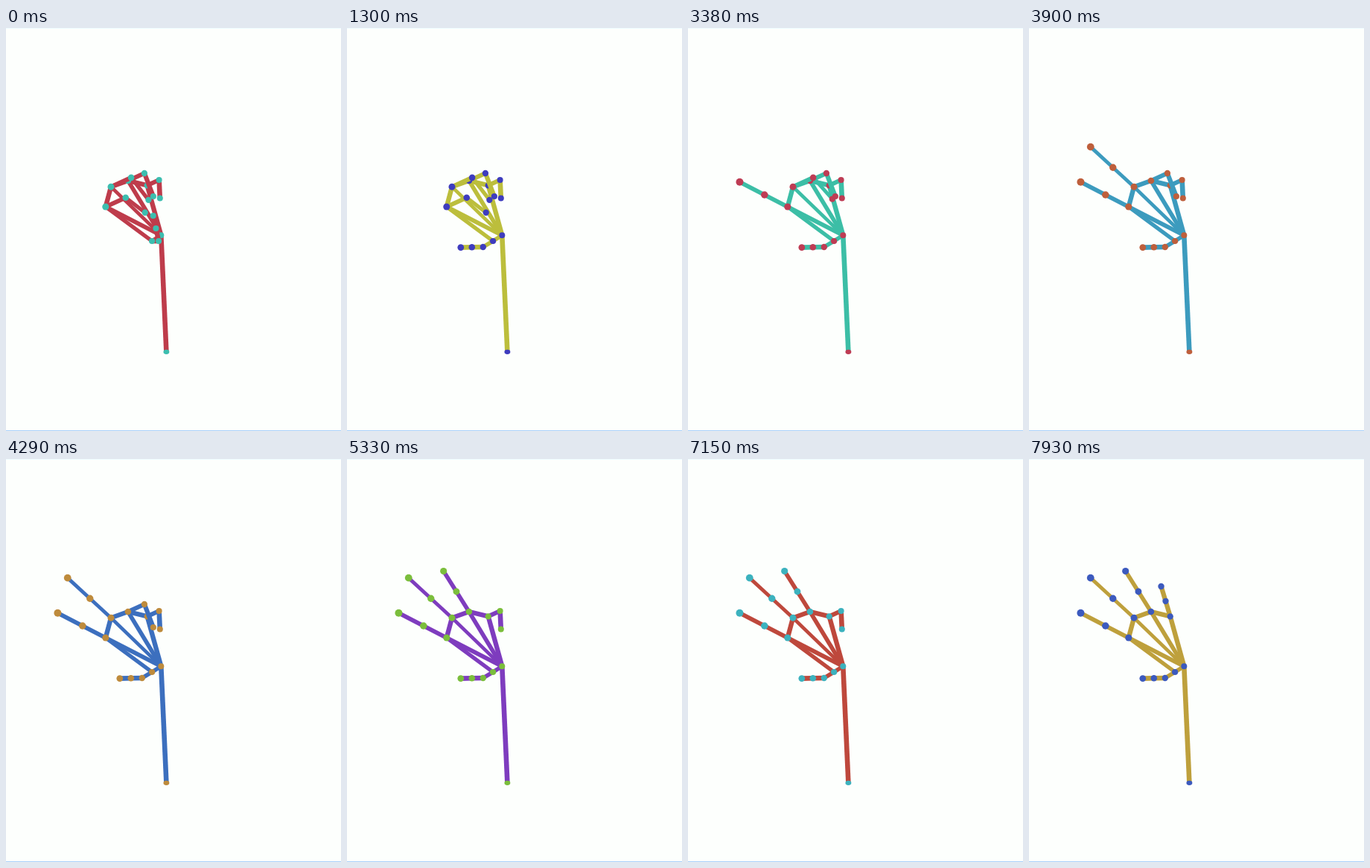
Write an HTML page with a canvas that moves like this. It is 450 by 541 pixels and loops after 8000 ms.

```html
<!DOCTYPE html>
<html lang="en">
<head>
<meta charset="utf-8">
<title>Unfolding hand</title>
<style>
  html, body { margin: 0; width: 450px; height: 541px; overflow: hidden; }
  canvas { display: block; }
</style>
</head>
<body>
<canvas id="stage" width="450" height="541"></canvas>
<script>
const ctx = document.getElementById('stage').getContext('2d');
const LOOP = 8000, STEP = 130, UNFOLD = 430, LINE = 6.6;
const WRIST = [208.3, 278.3], ELBOW = [215.4, 434.8];

const scale = (v, k) => v.map(n => n * k);
const add = (a, b) => [a[0] + b[0], a[1] + b[1]];
const polar = (length, degrees) => {
  const a = degrees * Math.PI / 180;
  return [length * Math.cos(a), length * Math.sin(a)];
};

// A bone is its screen vector when open, bent by 90 and curled by 180 degrees.
// Fingers fan out evenly, bend the same way, and look larger towards the left.
function finger(order, start, base, length, bentLength) {
  const open = polar(length, 207.3 + 15.3 * order);
  const bent = polar(bentLength, -24.5);
  const curled = add(scale(open, -1), [-5, 4]);
  const grow = 1.33 - 0.0019 * base[0];
  return {
    start, base, curl: [90, 180], bulge: 0.2,
    bones: [
      { open, bent, curled },
      { open: scale(open, grow), bent: scale(bent, grow), curled }
    ]
  };
}

const index = finger(0, 1960, [133.8, 240], 34.9, 29.6);
const middle = finger(1, 3337, [141, 213.2], 38.4, 29.8);
const ring = finger(2, 4900, [163.9, 205], 31.9, 24.2);
const pinky = finger(3, 7240, [189.7, 211.3], 21.4, 17.5);

const thumbTip = { open: [-15, 0.3], bent: [3.7, 17], curled: [9, 0] };
const thumb = {
  start: 434, base: [196.1, 286], curl: [180, 270], bulge: 0,
  bones: [{ open: [-13.3, 8], bent: [-4, 14], curled: [9, 0] }, thumbTip, thumbTip]
};
const backToFront = [pinky, ring, middle, index, thumb];

function smooth(u) {
  u = Math.min(1, Math.max(0, u));
  return u * u * (3 - 2 * u);
}

function boneVector({ open, bent, curled }, degrees, bulge) {
  const [c, s] = polar(1, degrees);
  const flat = add(scale(c > 0 ? open : curled, Math.abs(c)), scale(bent, s));
  return scale(flat, 1 + bulge * Math.max(0, 2 * s * c));
}

// The outer joints straighten first, the base joint follows.
function joints({ start, base, curl, bulge, bones }, t) {
  const p = (t - start) / UNFOLD;
  const baseAngle = curl[0] * (1 - smooth((p - 0.2) / 0.8));
  const tipAngle = baseAngle + (curl[1] - curl[0]) * (1 - smooth(p / 0.7));
  const points = [base];
  bones.forEach((bone, i) => {
    const vector = boneVector(bone, i ? tipAngle : baseAngle, bulge * (1 + i / 2));
    points.push(add(points[i], vector));
  });
  return points;
}

// Lines have their width along one axis, so diagonals look thinner.
function line(...points) {
  for (let i = 1; i < points.length; i++) {
    const [x1, y1] = points[i - 1], [x2, y2] = points[i];
    const steep = Math.abs(y2 - y1) > Math.abs(x2 - x1);
    const w = steep ? LINE / 2 : 0, h = steep ? 0 : LINE / 2;
    ctx.beginPath();
    ctx.moveTo(x1 - w, y1 - h);
    ctx.lineTo(x1 + w, y1 + h);
    ctx.lineTo(x2 + w, y2 + h);
    ctx.lineTo(x2 - w, y2 - h);
    ctx.fill();
  }
}

function dot([x, y], squash = 1) {
  const r = 5.5 - 0.0072 * x;
  ctx.beginPath();
  ctx.ellipse(x, y, r, r * squash, 0, 0, Math.PI * 2);
  ctx.fill();
}

function draw(t) {
  ctx.fillStyle = '#fdfffd';
  ctx.fillRect(0, 0, 450, 541);
  ctx.fillStyle = '#effcff';
  ctx.fillRect(0, 0, 450, 1);
  ctx.fillStyle = '#a9d0fa';
  ctx.fillRect(0, 540, 450, 1);

  const hue = 353 + t * 0.0521;
  const paint = (shift, shape) => {
    ctx.fillStyle = `hsl(${hue + shift}, 52%, 49%)`;
    shape();
  };

  paint(0, () => {
    line(WRIST, ELBOW);
    for (const f of backToFront) line(WRIST, f.base);
    line(thumb.base, index.base, middle.base, ring.base, pinky.base);
  });
  paint(180, () => {
    dot(WRIST);
    dot(ELBOW, 0.8);
  });
  for (const f of backToFront) {
    const points = joints(f, t);
    paint(0, () => line(...points));
    paint(180, () => points.forEach(p => dot(p)));
  }
}

const begin = performance.now();
function tick() {
  const t = (performance.now() - begin) % LOOP;
  draw(Math.floor(t / STEP) * STEP);
  requestAnimationFrame(tick);
}
tick();
</script>
</body>
</html>
```
